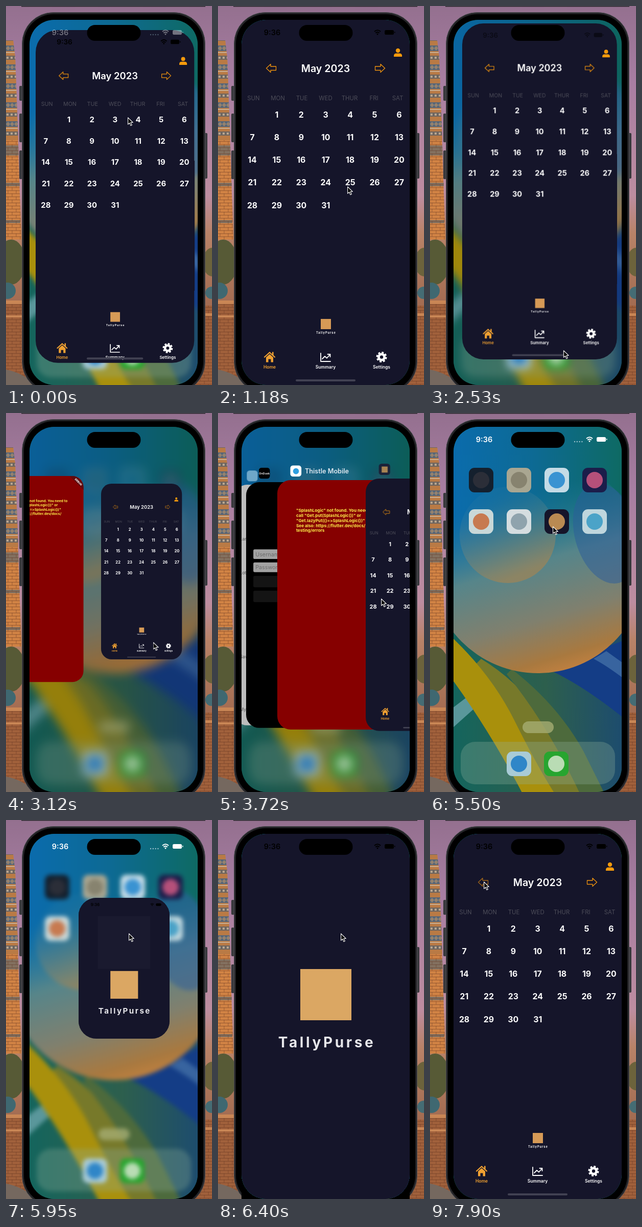
An HTML page for the animation above (8000 ms loop, 403 by 740 pixels).

```html
<!DOCTYPE html>
<html lang="en">
<head>
<meta charset="utf-8">
<title>Budget calendar demo</title>
<style>
  html, body { margin: 0; width: 100%; height: 100%; overflow: hidden; background: #9a7596; }
  body { position: relative; font-family: Inter, sans-serif; }
  svg { position: absolute; left: 0; top: 0; overflow: visible; }
  #screen { position: absolute; left: 46px; top: 27px; width: 329px; height: 713px; border-radius: 48px; overflow: hidden; background: #0f5e5a; }
  #stage { position: absolute; left: -46px; top: -27px; width: 403px; height: 740px; }

  .card { position: absolute; left: 0; top: 0; width: 329px; height: 713px; transform-origin: 0 0; }
  .face { position: absolute; inset: 0; border-radius: 38px; overflow: hidden; }
  .label { position: absolute; left: 37px; top: -42px; height: 32px; display: flex; align-items: center; gap: 10px; font: 600 18.5px Inter, sans-serif; color: #dfe8f0; white-space: nowrap; }
  .tile { width: 32px; height: 32px; border-radius: 8px; display: grid; place-items: center; font-size: 8px; color: #fff; }
  .tile i { width: 17px; height: 17px; background: var(--mark); }
  .dot { border-radius: 50%; }

  #red .face { background: #860000; }
  #red p { position: absolute; left: 54px; top: 80px; margin: 0; font: 700 12px/14.3px Inter, sans-serif; font-feature-settings: "calt" 0; color: #ffef4a; white-space: pre; }
  #red b { position: absolute; left: 252px; top: 13px; width: 120px; text-align: center; font: 800 9px/15px Inter, sans-serif; color: #fff; background: #5e0a0e; transform: rotate(45deg); }
  #login .face { background: #000; }
  #login span { position: absolute; left: 21px; width: 281px; height: 28px; padding-left: 6px; border-radius: 4px; font: 16px/28px Inter, sans-serif; color: #6c6c6c; background: #a2a2a2; }
  #login span.button { height: 33px; background: #141414; }
  #map .face { background: #bdbdbd; font: 13px/20px Inter, sans-serif; color: #555; }
  #map span { position: absolute; left: 16px; }

  #app { overflow: hidden; background: #15152a; }
  #bar { position: absolute; left: 106px; bottom: 7px; width: 117px; height: 4px; border-radius: 2px; background: #414152; }
  #splash { position: absolute; inset: 0; height: 713px; background: #15152a; }

  .card, .label, #home, #icons, #homeStatus, #appStatus, #splash, #ghost, #cursor, #back { animation: 8s linear infinite paused; }
  #app { animation-name: app; }
  #appLabel { animation-name: appLabel; }
  #red { animation-name: red; }
  #login { animation-name: login; }
  #map { animation-name: map; }
  .label { animation-name: label; }
  #home { animation-name: home; }
  #icons { animation-name: icons; }
  #homeStatus { animation-name: homeStatus; }
  #appStatus { animation-name: appStatus; }
  #splash { animation-name: splash; }
  #ghost { animation-name: ghost; }
  #cursor { animation-name: cursor; }
  #back { animation-name: back; }

  @keyframes app {
    0%, 1.5% { transform: translate(58px, 47px) scale(.943); height: 689px; border-radius: 46px; }
    1.9% { transform: translate(51px, 35px) scale(.974); height: 702px; }
    3.75% { transform: translate(47px, 29px) scale(.994); height: 711px; }
    5.5%, 29.8% { transform: translate(46px, 27px) scale(1); height: 713px; border-radius: 46px; opacity: 1; }
    31.6% { transform: translate(63px, 34px) scale(.92); }
    33.5% { transform: translate(98px, 56px) scale(.77); }
    35.4% { transform: translate(135px, 88px) scale(.63); }
    37.2% { transform: translate(168px, 120px) scale(.53); border-radius: 42px; }
    38.9%, 39.2% { transform: translate(186px, 138px) scale(.481); border-radius: 42px; }
    40.9% { transform: translate(215px, 137px) scale(.53); }
    42.8% { transform: translate(268px, 131px) scale(.65); }
    44.5%, 46.7% { transform: translate(289px, 128px) scale(.691); border-radius: 38px; }
    48.4% { transform: translate(289px, 40px) scale(.691); }
    50.3% { transform: translate(289px, -190px) scale(.691); }
    52.2% { transform: translate(289px, -520px) scale(.691); opacity: 1; height: 713px; }
    52.3% { opacity: 0; }
    70.5% { transform: translate(224px, 188px) scale(.146); height: 329px; border-radius: 72px; opacity: 0; }
    70.6% { transform: translate(224px, 188px) scale(.146); opacity: 0; }
    72.5% { transform: translate(196px, 178px) scale(.29); height: 400px; border-radius: 70px; opacity: 1; }
    74.2%, 74.5% { transform: translate(142px, 152px) scale(.541); height: 508px; border-radius: 64px; }
    76.25% { transform: translate(78px, 78px) scale(.83); height: 620px; border-radius: 54px; }
    78.1% { transform: translate(53px, 38px) scale(.965); height: 694px; }
    79.9%, 100% { transform: translate(46px, 27px) scale(1); height: 713px; border-radius: 46px; opacity: 1; }
  }
  @keyframes appLabel {
    0%, 46.7% { opacity: .9; transform: translate(289px, 128px) scale(.691); }
    50.2%, 100% { opacity: 0; transform: translate(289px, 60px) scale(.691); }
  }
  @keyframes red {
    0%, 31.6% { transform: translate(-340px, 60px) scale(.9); }
    35.4% { transform: translate(-120px, 98px) scale(.68); }
    38.9%, 39.2% { transform: translate(-34px, 123px) scale(.564); }
    40.9% { transform: translate(15px, 126px) scale(.6); }
    44.5%, 50.3% { transform: translate(116px, 131px) scale(.683); }
    55.8%, 63.4% { transform: translate(84px, 133px) scale(.683); opacity: 1; }
    65% { transform: translate(-60px, 133px) scale(.683); opacity: .7; }
    66.8%, 100% { transform: translate(-280px, 133px) scale(.683); opacity: 0; }
  }
  @keyframes login {
    0%, 39.2% { transform: translate(-230px, 130px) scale(.6); }
    44.5%, 50.3% { transform: translate(55px, 135px) scale(.673); }
    55.8%, 63.4% { transform: translate(39px, 136px) scale(.673); opacity: 1; }
    65% { transform: translate(-90px, 136px) scale(.673); opacity: .7; }
    66.8%, 100% { transform: translate(-280px, 136px) scale(.673); opacity: 0; }
  }
  @keyframes map {
    0%, 39.2% { transform: translate(-260px, 136px) scale(.6); }
    44.5%, 50.3% { transform: translate(32px, 140px) scale(.659); }
    55.8%, 63.4% { transform: translate(24px, 141px) scale(.659); opacity: 1; }
    66.8%, 100% { transform: translate(-280px, 141px) scale(.659); opacity: 0; }
  }
  @keyframes label { 0%, 39.2% { opacity: 0; } 44.5%, 63.4% { opacity: 1; } 66.8%, 100% { opacity: 0; } }
  @keyframes home {
    0%, 6% { filter: blur(5px) brightness(1); }
    31.6% { filter: blur(8px) brightness(.94); }
    35%, 63.4% { filter: blur(10px) brightness(.88); }
    66.8%, 70.6% { filter: blur(.5px) brightness(1); }
    74.2%, 100% { filter: blur(4px) brightness(1); }
  }
  @keyframes icons { 0%, 30% { opacity: .6; } 35%, 63.4% { opacity: .18; } 66.8%, 100% { opacity: 1; } }
  @keyframes homeStatus { 0%, 1.5% { opacity: .4; } 5.5%, 63.4% { opacity: 0; } 66.8%, 74.5% { opacity: 1; } 79.9%, 100% { opacity: 0; } }
  @keyframes appStatus { 0%, 29.8% { opacity: 1; } 33.4%, 60% { opacity: 0; } 60.1%, 100% { opacity: 1; } }
  @keyframes splash { 0%, 60% { opacity: 0; } 60.1%, 81% { opacity: 1; } 81.1%, 100% { opacity: 0; } }
  @keyframes ghost { 0%, 74.5% { opacity: 1; } 78%, 100% { opacity: 0; } }
  @keyframes back { 0%, 97.5% { opacity: 1; } 98%, 100% { opacity: .65; } }
  @keyframes cursor {
    0%, 5.6% { transform: translate(238px, 217px); }
    14.7%, 18.7% { transform: translate(253px, 352px); }
    20.4% { transform: translate(278px, 540px); }
    22.2%, 24.3% { transform: translate(296px, 656px); }
    26% { transform: translate(276px, 692px); }
    27.8%, 29.8% { transform: translate(256px, 721px); }
    33.5% { transform: translate(266px, 620px); }
    38.9%, 39.2% { transform: translate(287.5px, 447px); }
    44.5%, 46.7% { transform: translate(319px, 362px); }
    50.3% { transform: translate(322px, 170px); }
    52.2% { transform: translate(320px, 150px); }
    57.5%, 61.4% { transform: translate(285px, 560px); }
    63%, 63.4% { transform: translate(275px, 631px); }
    65% { transform: translate(272px, 600px); }
    68.7%, 87.6% { transform: translate(240px, 221px); }
    89.4% { transform: translate(172px, 183px); }
    91%, 93.2% { transform: translate(127px, 156px); }
    95% { transform: translate(117px, 143px); }
    96.9% { transform: translate(109px, 127px); }
    98.4%, 100% { transform: translate(105px, 120px); }
  }
</style>
</head>
<body>

<!-- Backdrop and phone body -->
<svg width="403" height="740" viewBox="0 0 403 740" style="overflow:hidden">
  <defs>
    <linearGradient id="sky" x2="0" y2="1">
      <stop stop-color="#94708f"/><stop offset=".2" stop-color="#a87ea2"/>
      <stop offset=".5" stop-color="#bd8da0"/><stop offset=".6" stop-color="#b98368"/><stop offset="1" stop-color="#8a5238"/>
    </linearGradient>
    <pattern id="tiles" width="8" height="37" patternUnits="userSpaceOnUse">
      <path d="M0 0H8V37H0Z" fill="#b97a45"/>
      <path d="M0 3H8V14H0Z" fill="#566679"/><path d="M0 8.500L4 4L8 8.500L4 13Z" fill="#94826f"/>
      <path d="M0 16H8V17.500H0Z" fill="#cdbda8"/>
      <path d="M0 23H8V31H0Z" fill="#6d6560"/><path d="M1 25H5V29H1Z" fill="#b8a58f"/>
    </pattern>
    <pattern id="bricks" width="16" height="12" patternUnits="userSpaceOnUse">
      <path d="M0 .5H16M0 6.500H16M4 0V6M12 6V12" stroke="#5a2f1c" stroke-opacity=".45"/>
    </pattern>
    <symbol id="status" overflow="visible">
      <text x="106" y="57" font-size="14.5" font-weight="600" text-anchor="middle" fill="currentColor">9:36</text>
      <path d="M306 50Q312 44.5 318 50M308.3 52.7Q312 49.5 315.7 52.7" fill="none" stroke="currentColor" stroke-width="2"/>
      <circle cx="312" cy="55" r="1.5" fill="currentColor"/>
      <rect x="326" y="47" width="18" height="9" rx="2.8" fill="currentColor"/>
      <rect x="345" y="50" width="1.5" height="3" rx=".7" fill="currentColor"/>
    </symbol>
  </defs>
  <path d="M0 0H403V740H0Z" fill="url(#sky)"/>
  <path d="M0 67H14L18 100L30 456H0Z" fill="#d08244"/>
  <path d="M0 67H14L18 100L24 262H0Z" fill="url(#tiles)"/>
  <path d="M0 272H24L25 292H0ZM0 345H27V352H0ZM0 418H28V424H0Z" fill="#83705f"/>
  <path d="M0 262H24L30 456H0Z" fill="url(#bricks)"/>
  <ellipse cx="10" cy="500" rx="28" ry="44" fill="#575a36"/>
  <ellipse cx="403" cy="500" rx="18" ry="28" fill="#6c633c"/>
  <path d="M0 575H60V740H0ZM360 585H403V740H360Z" fill="#a0603b"/>
  <path d="M0 575H60V740H0ZM360 585H403V740H360Z" fill="url(#bricks)"/>
  <path d="M0 575H36V582H0ZM0 604H36V608H0ZM385 600H403V605H385Z" fill="#c98655"/>
  <circle cx="3" cy="556" r="16" fill="#3f6871"/><circle cx="402" cy="560" r="12" fill="#456c74"/>
  <path d="M0 710Q30 715 60 740H0Z" fill="#75685f"/>
  <path d="M30 0H390V1.5H30Z" fill="#2c2a2e"/>
  <g fill="#39393d">
    <rect x="26" y="156" width="6" height="29" rx="2"/><rect x="26" y="210" width="6" height="56" rx="2"/>
    <rect x="26" y="282" width="6" height="56" rx="2"/><rect x="388" y="248" width="6" height="89" rx="2"/>
  </g>
  <rect x="31.5" y="12.5" width="358" height="743" rx="61" fill="#242427" stroke="#505055"/>
  <rect x="35" y="16" width="351" height="736" rx="58"/>
</svg>

<div id="screen"><div id="stage">
  <div id="home">
    <svg width="403" height="740" viewBox="0 0 403 740">
      <defs>
        <linearGradient id="top"><stop offset=".1" stop-color="#0a6cb2"/><stop offset=".5" stop-color="#0d6a94"/><stop offset=".9" stop-color="#0e6a5e"/></linearGradient>
        <linearGradient id="low"><stop offset=".1" stop-color="#0f6660"/><stop offset=".55" stop-color="#2d5f4d"/><stop offset=".9" stop-color="#1b4a72"/></linearGradient>
        <linearGradient id="orb" x1=".3" x2=".6" y2="1">
          <stop offset=".2" stop-color="#1e7a9c" stop-opacity="0"/><stop offset=".5" stop-color="#56858a"/>
          <stop offset=".75" stop-color="#80806e"/><stop offset=".93" stop-color="#a9793f"/><stop offset="1" stop-color="#c08040"/>
        </linearGradient>
        <linearGradient id="inner" x2=".4" y2="1"><stop offset=".2" stop-color="#3f84a4" stop-opacity=".2"/><stop offset="1" stop-color="#a08455"/></linearGradient>
      </defs>
      <path d="M-40-40H443V420H-40Z" fill="url(#top)"/>
      <path d="M-40 400H443V780H-40Z" fill="url(#low)"/>
      <path d="M230 500Q320 540 443 650V420Z" fill="#143d86"/>
      <path d="M320 480Q360 500 443 570V535L345 465Z" fill="#38649f"/>
      <path d="M-40 640L85 545L100 565L-40 690Z" fill="#5a979b"/>
      <path d="M100 480Q200 540 260 660L320 780H210Q170 640 80 500Z" fill="#77792a"/>
      <path d="M160 500Q250 570 300 660L360 780H310Q240 620 150 510Z" fill="#4d6a3c"/>
      <path d="M-40 370Q100 470 165 600T270 780H200Q130 640 47 525L-40 450Z" fill="#a9900c"/>
      <circle cx="211" cy="297" r="211" fill="url(#orb)"/>
      <circle cx="152" cy="238" r="94" fill="url(#inner)" opacity=".7"/>
      <ellipse cx="345" cy="235" rx="62" ry="100" fill="#2a5c9c" opacity=".5" transform="rotate(-15 345 235)"/>
      <rect x="60" y="642" width="302" height="83" rx="28" fill="#8fae9c" opacity=".3"/>
      <rect x="181" y="602" width="61" height="23" rx="12" fill="#a5ad72" opacity=".8"/>
      <g id="icons"></g>
      <g id="dock"></g>
    </svg>
  </div>

  <div class="card" id="map">
    <div class="face">
      <span style="top:150px">Lane</span><span style="top:250px">Lot</span>
      <span style="top:500px">Saved</span><span style="top:655px">My list</span>
    </div>
    <div class="label"><div class="tile" style="background:#6ea7c9"></div></div>
  </div>
  <div class="card" id="login">
    <div class="face">
      <span style="top:195px">Username</span><span style="top:233px">Password</span>
      <span class="button" style="top:272px"></span><span class="button" style="top:315px"></span>
    </div>
    <div class="label"><div class="tile" style="background:#000">OnDusk</div></div>
  </div>
  <div class="card" id="red">
    <div class="face">
      <p>"SplashLogic" not found. You need to
call "Get.put(SplashLogic())" or
"Get.lazyPut(()=&gt;SplashLogic())"
See also: https://flutter.dev/docs/
testing/errors</p>
      <b>DEBUG</b>
    </div>
    <div class="label"><div class="tile" style="background:#fff;--mark:#2f9fe0"><i class="dot"></i></div>Thistle Mobile</div>
  </div>
  <div class="card" id="appLabel" style="height:0">
    <div class="label"><div class="tile" style="background:#1c1c35;--mark:#b98a52"><i></i></div></div>
  </div>

  <div class="card" id="app">
    <svg width="329" height="713" viewBox="46 27 329 713">
      <g fill="#f59a0c">
        <circle cx="352" cy="87" r="4.2"/><path d="M344 99V97Q344 92.5 349 92.5H355Q360 92.5 360 97V99Z"/>
      </g>
      <g fill="none" stroke="#ef930f" stroke-width="1.3" stroke-linejoin="round">
        <path id="back" d="M94.5 121.5L103 113.5V118H113.5V125.5H103V129.5Z"/>
        <path d="M326.5 121.5L318 113.5V118H307.5V125.5H318V129.5Z"/>
      </g>
      <text x="210.5" y="128.8" font-size="19.6" font-weight="600" text-anchor="middle" fill="#fff">May 2023</text>
      <g id="weekdays" font-size="11.4" text-anchor="middle" fill="#4d4d59"></g>
      <g id="dates" font-size="15.8" font-weight="700" text-anchor="middle" fill="#fff"></g>
      <rect x="201" y="611" width="20" height="20" fill="#d69a56"/>
      <text x="211.4" y="640" font-size="5.6" font-weight="700" letter-spacing="1" text-anchor="middle" fill="#fff">TallyPurse</text>
      <g fill="#f0a132">
        <path d="M91 685.5L101 676.5L111 685.5" fill="none" stroke="#f0a132" stroke-width="2.2" stroke-linecap="round"/>
        <path d="M94 686L101 679.7L108 686V695.5H103.5V689.5H98.5V695.5H94ZM106 675.5H108.6V682H106Z"/>
      </g>
      <g fill="none" stroke="#fff" stroke-width="1.8" stroke-linejoin="round" stroke-linecap="round">
        <path d="M201 678V694H220M204 689L209 684L213 687.5L219 680.5M214.5 680H219.5V685"/>
        <circle cx="320" cy="685.5" r="5.6" stroke-width="4.8"/>
        <circle cx="320" cy="685.5" r="8.7" stroke-width="3.6" stroke-linecap="butt" stroke-dasharray="3.8 3.03"/>
      </g>
      <g font-size="8.5" font-weight="600" text-anchor="middle" fill="#fff">
        <text x="101" y="708" fill="#f0a132">Home</text><text x="210.5" y="708">Summary</text><text x="320" y="708">Settings</text>
      </g>
    </svg>
    <div id="bar"></div>
    <div id="splash">
      <svg width="329" height="713" viewBox="0 0 329 713">
        <rect id="ghost" x="69" y="66" width="190" height="190" fill="#1a1a2f"/>
        <rect x="115" y="264" width="100" height="100" fill="#dba763"/>
        <text x="167" y="417" font-size="28" font-weight="700" letter-spacing="4.6" text-anchor="middle" fill="#e6e6ea">TallyPurse</text>
      </svg>
    </div>
    <svg id="appStatus" width="329" height="713" viewBox="46 27 329 713" color="#000"><use href="#status"/></svg>
  </div>

  <svg id="homeStatus" width="403" height="740" viewBox="0 0 403 740" color="#fff">
    <use href="#status"/>
    <path d="M283 56H300" stroke="#9fc3cf" stroke-width="2.4" stroke-linecap="round" stroke-dasharray="0 4.8"/>
  </svg>
</div></div>

<svg width="403" height="740" viewBox="0 0 403 740" style="overflow:hidden">
  <rect x="158.5" y="37" width="105" height="31" rx="15.5"/>
  <g id="cursor"><path d="M.6 .8V14.2L3.7 11.3L6 16.6L8.3 15.6L6 10.5H10.3Z" stroke="#fff" stroke-width="1.1" stroke-linejoin="round"/></g>
</svg>

<script>
  const LOOP = 8000, TICK = 148.7, LEAD = 12;
  const byId = id => document.getElementById(id);
  const label = (x, y, text) => `<text x="${x}" y="${y}">${text}</text>`;

  const dayX = [69.5, 117, 164, 210.5, 257.5, 305, 351.5];
  byId('weekdays').innerHTML = ['SUN', 'MON', 'TUE', 'WED', 'THUR', 'FRI', 'SAT']
    .map((day, i) => label(dayX[i], 184.3, day)).join('');

  // The first of the month is a Monday, so the date is also its cell index.
  byId('dates').innerHTML = Array.from({ length: 31 }, (_, i) => i + 1)
    .map(d => label(67 + d % 7 * 47.9, 217.7 + Math.floor(d / 7) * 44.25, d)).join('');

  const icon = ([x, y, tile, mark]) =>
    `<rect x="${x - 24}" y="${y - 24}" width="48" height="48" rx="11" fill="${tile}"/>` +
    `<circle cx="${x}" cy="${y}" r="16" fill="${mark}"/>`;
  byId('icons').innerHTML = [
    [100, 131, '#14202e', '#2b2e38'], [174, 131, '#a9a691', '#87836f'],
    [248, 131, '#c4dbe6', '#3a93d2'], [322, 131, '#1b1d4a', '#b5507a'],
    [100, 212, '#c9d8d8', '#c77a50'], [174, 212, '#d5dde0', '#8fa3ad'],
    [248, 212, '#15152a', '#b98a52'], [322, 212, '#bfd6dd', '#4ba3c8']
  ].map(icon).join('');
  byId('dock').innerHTML = [
    [174, 685, '#a9cbd6', '#2f86c8'], [247, 685, '#27a52f', '#b9dcb4']
  ].map(icon).join('');

  const tracks = document.getAnimations();
  const start = performance.now();
  function draw() {
    const time = (performance.now() - start) % LOOP;
    const pose = Math.floor((time + LEAD) / TICK) * TICK;
    for (const track of tracks) track.currentTime = pose;
    requestAnimationFrame(draw);
  }
  draw();
</script>
</body>
</html>
```
